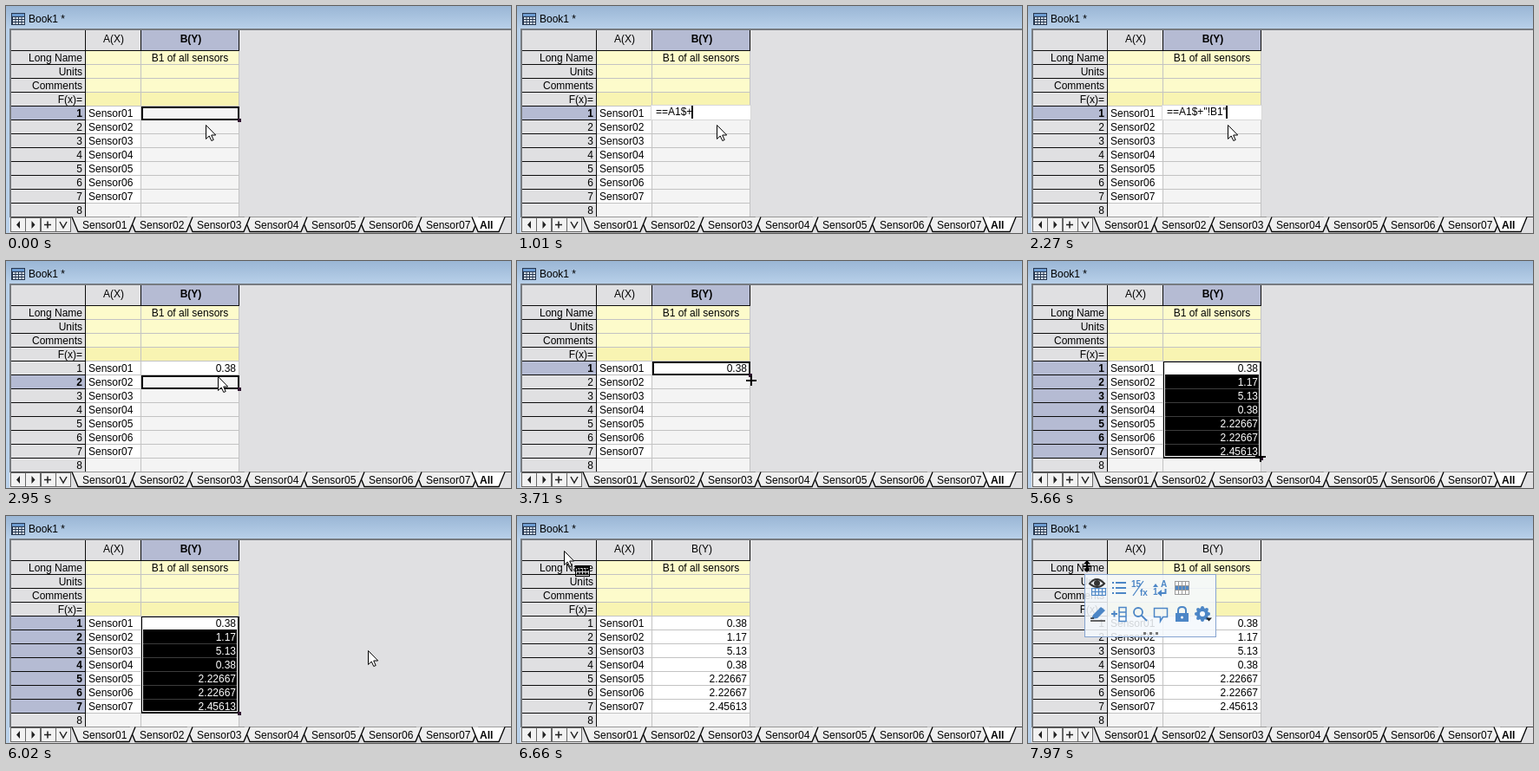
Animation of 582 by 262 pixels, one loop 8000 ms. Source, as an HTML page with a canvas:

```html
<!DOCTYPE html>
<html lang="en">
<head>
<meta charset="utf-8">
<style>
html, body { margin: 0; width: 100%; height: 100%; overflow: hidden; background: #e0e0e2; }
canvas { display: block; }
</style>
</head>
<body>
<canvas id="stage" width="582" height="262"></canvas>
<script>
const ctx = document.getElementById('stage').getContext('2d');
const LOOP = 8000, ROW = 16, TOP = 116;
const COL_A = 92, COL_B = 156, RIGHT = 268, WIDTH_B = RIGHT - COL_B;
const PANEL = '#e0e0e2', MARKED = '#b5bbd3', LINE = '#0c0c0c', GRID = '#c3c3c3';
const BLUE = '#4c86c6', INK = '#000';
const values = ['0.38', '1.17', '5.13', '0.38', '2.22667', '2.22667', '2.45613'];
const formula = '==A1$+"!B1"';
const keyTimes = [310, 390, 470, 550, 630, 930, 1090, 1400, 1550, 1950, 2270];
const ENTER = 2670, RESELECT = 3330, DRAG = 3940, FILL = 5660, DESELECT = 6157;

// Pointer moves: first step, last step, step count, end x, end y
const moves = [
  [2740, 3100, 6, 258, 129],
  [3480, 3480, 1, 265, 131],
  [3710, 3710, 1, 270, 138],
  [3940, 3940, 1, 268, 137],
  [4110, 4880, 11, 268, 222],
  [5350, 5430, 2, 268, 225],
  [5660, 5660, 1, 268, 226],
  [5810, 6070, 4, 444, 142],
  [6244, 6590, 5, 48, 33],
  [6660, 6660, 1, 54, 40],
  [6740, 6740, 1, 51, 38],
  [6890, 6970, 2, 51, 42],
  [7890, 7890, 1, 62, 54],
  [7970, 7970, 1, 68, 58]
];
const clicks = [[3330, 3405], [DRAG, FILL], [DESELECT, 6244], [7200, 7350]];
const within = (t, from, to) => t >= from && t < to;

function pointerAt(t) {
  let x = 230, y = 137;
  for (const [start, end, steps, toX, toY] of moves) {
    if (t < start) break;
    const gap = (end - start) / (steps - 1 || 1);
    const done = gap ? Math.min(steps, Math.floor((t - start) / gap + 1e-6) + 1) : 1;
    const p = done / steps, ease = p * p * (3 - 2 * p);
    x += (toX - x) * ease;
    y += (toY - y) * ease;
  }
  return [Math.round(x), Math.round(y)];
}

function rect(x, y, w, h, color) {
  ctx.fillStyle = color;
  ctx.fillRect(x, y, w, h);
}

function frame(x, y, w, h, color, size = 1) {
  ctx.strokeStyle = color;
  ctx.lineWidth = size;
  ctx.strokeRect(x + size / 2, y + size / 2, w - size, h - size);
}

function text(str, x, y, { align = 'left', color = INK, bold = false, size = 12 } = {}) {
  ctx.font = `${bold ? 'bold ' : ''}${size}px "Liberation Sans", Arial, sans-serif`;
  ctx.textAlign = align;
  ctx.fillStyle = color;
  ctx.fillText(str, x, y);
}

function shape(d, { fill, stroke, width = 1, x = 0, y = 0 }) {
  const path = new Path2D(d);
  ctx.save();
  ctx.translate(x, y);
  if (fill) { ctx.fillStyle = fill; ctx.fill(path); }
  if (stroke) { ctx.strokeStyle = stroke; ctx.lineWidth = width; ctx.stroke(path); }
  ctx.restore();
}

function disc(x, y, r, color) {
  ctx.fillStyle = color;
  ctx.beginPath();
  ctx.arc(x, y, r, 0, 2 * Math.PI);
  ctx.fill();
}

function drawWindow() {
  const caption = ctx.createLinearGradient(0, 0, 0, 27);
  caption.addColorStop(0, '#9ab6d5');
  caption.addColorStop(1, '#b9d1ea');
  rect(0, 0, 582, 262, PANEL);
  rect(0, 0, 582, 27, caption);
  rect(0, 27, 4, 235, '#b9d1ea');
  rect(4, 26, 578, 2, '#777b80');
  rect(4, 26, 2, 236, '#777b80');
  rect(6, 8, 16, 14, '#26364e');
  rect(7, 9, 14, 3, '#6c9bd0');
  for (let i = 0; i < 12; i++) rect(8 + i % 4 * 3.5, 13 + (i >> 2) * 3, 2.5, 2, '#dbe6f2');
  text('Book1 *', 26, 19);
}

function drawSheet(filled, first, last) {
  const marked = first > 0;
  rect(6, 28, 85, 23, PANEL);
  rect(COL_B, 28, WIDTH_B, 23, marked ? MARKED : PANEL);
  text('A(X)', 124, 42, { align: 'center' });
  text('B(Y)', 213, 42, { align: 'center', bold: marked });

  rect(COL_A, 52, RIGHT - COL_A, 48, '#fdfbcb');
  rect(COL_A, 100, RIGHT - COL_A, 15, '#f8f4b2');
  ['Long Name', 'Units', 'Comments', 'F(x)='].forEach((label, i) =>
    text(label, 88, 64 + i * ROW, { align: 'right' }));
  text('B1 of all sensors', 212, 64, { align: 'center' });

  for (let row = 1; row <= 8; row++) {
    const y = TOP + (row - 1) * ROW, chosen = row >= first && row <= last;
    if (chosen) rect(6, y, 85, 15, MARKED);
    text(row, 88, y + 12, { align: 'right', bold: chosen });
    const dark = chosen && row > first;
    rect(COL_A, y, 63, 15, row < 8 ? '#fff' : '#f4f4f4');
    rect(COL_B, y, WIDTH_B, 15, dark ? INK : row <= filled ? '#fff' : '#f4f4f4');
    if (row < 8) text('Sensor0' + row, 95, y + 12);
    if (row <= filled) text(values[row - 1], 265, y + 12, { align: 'right', color: dark ? '#fff' : INK });
  }

  for (let y = 51; y < 244; y += ROW) {
    rect(6, y, 85, 1, LINE);
    rect(COL_A, y, RIGHT - COL_A + 1, 1, y < 52 ? LINE : GRID);
  }
  for (const x of [91, 155, RIGHT]) {
    rect(x, 28, 1, 24, LINE);
    rect(x, 52, 1, 192, x < 92 ? LINE : GRID);
  }
  for (let row = first; row < last; row++) {
    rect(COL_B, TOP + row * ROW - 1, WIDTH_B, 1, row === first ? INK : '#3c3c3c');
  }
}

function drawSelection(first, last) {
  const y = TOP + (first - 1) * ROW, h = (last - first + 1) * ROW;
  frame(COL_B, y, WIDTH_B + 1, h, INK, 2);
  if (last > first) frame(COL_B + 1, y + 1, WIDTH_B - 2, h - 3, '#fff');
  rect(267, y + h - 2, 4, 4, '#301430');
}

function drawDragOutline(rows) {
  const h = rows * ROW - 1;
  ctx.globalCompositeOperation = 'difference';
  for (let y = 0; y < h; y++) {
    for (let x = y % 2; x < WIDTH_B; x += 2) {
      if (x < 3 || x >= WIDTH_B - 3 || y < 3 || y >= h - 3) rect(COL_B + x, TOP + y, 1, 1, '#fff');
    }
  }
  ctx.globalCompositeOperation = 'source-over';
}

function drawEditor(t) {
  const typed = formula.slice(0, keyTimes.filter(k => k <= t).length);
  rect(155, 114, 115, 18, '#fff');
  frame(154, 114, 116, 18, '#d8d8d8');
  text(typed, 160, 126);
  rect(Math.round(159 + ctx.measureText(typed).width), 115, 2, 15, INK);
}

function drawTabs() {
  rect(4, 244, 578, 18, PANEL);
  rect(6, 243, 576, 1, '#404040');
  for (let i = 0; i < 4; i++) {
    const x = Math.round(5 + i * 17.4);
    rect(x, 244, 18, 17, '#f2f2f2');
    frame(x, 244, 18, 17, '#666');
  }
  shape('M16 248v9l-4-4.5zM29.5 248v9l4-4.5z', { fill: '#222' });
  shape('M44 252.5h8M48 248.5v8M62 249l4 7 4-7', { stroke: '#222', width: 1.5 });

  const tab = (x, w, fill) => {
    shape(`M${x} 243.5l7 17h${w - 14}l7-17z`, { fill });
    shape(`M${x} 243.5l7 17h${w - 14}l7-17`, { stroke: INK, width: 1.3 });
  };
  for (let i = 6; i >= 0; i--) {
    tab(76 + i * 66, 73, '#efefef');
    text('Sensor0' + (i + 1), 88 + i * 66, 257);
  }
  tab(537, 38, '#fff');
  text('All', 546, 257, { bold: true });
}

function drawToolbar(alpha) {
  ctx.globalAlpha = alpha * 0.86;
  rect(65, 67, 152, 73, '#f4f8fd');
  ctx.globalAlpha = alpha;
  frame(65, 67, 152, 73, '#86a4d0');

  // Upper row: show, list, format, sort, table
  shape('M71 78q8-10 17 0q-8 8-17 0z', { stroke: '#333', width: 2 });
  disc(79.5, 77.5, 3.5, '#333');
  rect(73, 83, 17, 9, BLUE);
  for (let i = 0; i < 8; i++) rect(74 + i % 4 * 4, 84 + (i >> 2) * 4, 3, 3, '#dce8f5');
  for (const y of [77, 83, 89]) {
    rect(97, y - 1, 2, 2, BLUE);
    rect(101, y - 1, 12, 2, BLUE);
  }
  text('15', 119, 82, { color: BLUE, size: 10, bold: true });
  text('fx', 129, 92, { color: BLUE, size: 10, bold: true });
  shape('M121 92l12-17', { stroke: BLUE, width: 1.3 });
  text('1', 144, 91, { color: BLUE, size: 10, bold: true });
  text('A', 153, 82, { color: BLUE, size: 10, bold: true });
  shape('M158.5 84v5h-6', { stroke: BLUE, width: 2 });
  shape('M149 89l5-4v8zM147 82l-3 0 3-4 3 4z', { fill: BLUE });
  rect(169, 75, 17, 16, '#9a9a9a');
  for (let i = 0; i < 12; i++) {
    rect(170 + i % 4 * 4, 76 + (i >> 2) * 5, 3, 4, (i >> 2) === 1 ? BLUE : '#fff');
  }

  // Lower row: edit, insert, zoom, note, lock, settings
  shape('M75 114l9-9 5 4-9 9-7 1z', { fill: BLUE });
  shape('M72 121h17M76 118h-4', { stroke: '#333', width: 1.5 });
  shape('M96 113h7M99.5 109.5v7', { stroke: BLUE, width: 2 });
  shape('M105 105.5h8v16h-8zM105 111h8M105 116h8', { stroke: BLUE, width: 1.5 });
  shape('M122 111a5 5 0 1 0 10 0a5 5 0 1 0-10 0M131 115l6 6', { stroke: BLUE, width: 1.8 });
  shape('M145.5 106.5h15v10h-5l-3 5v-5h-7z', { stroke: BLUE, width: 1.5 });
  rect(170, 112, 15, 10, BLUE);
  shape('M173 112v-3q0-4 4.5-4t4.5 4v3', { stroke: BLUE, width: 2 });
  disc(177.5, 117, 1.5, '#fff');
  for (let i = 0; i < 8; i++) {
    const a = i * Math.PI / 4;
    disc(201 + 7 * Math.cos(a), 113 + 7 * Math.sin(a), 2, BLUE);
  }
  disc(201, 113, 7, BLUE);
  disc(201, 113, 3, '#f4f8fd');
  shape('M205 117.5h7l-3.5 4z', { fill: '#222' });
  for (const x of [133, 140, 147]) rect(x, 134, 3, 3, '#777');
  ctx.globalAlpha = 1;
}

function drawPointer(t, x, y) {
  if (clicks.some(([from, to]) => within(t, from, to))) disc(x + 0.5, y, 11.5, 'rgba(247,230,66,.88)');
  if (within(t, 3710, 5810)) {
    rect(x - 6, y - 1, 12, 2, INK);
    rect(x - 1, y - 6, 2, 12, INK);
  } else if (t >= 7970) {
    shape('M0-7l4 4.5h-3v1.5h4v2h-4v1.5h3l-4 4.5-4-4.5h3v-1.5h-4v-2h4v-1.5h-3z', { x, y, fill: INK });
  } else {
    shape('M.5.5v16l3.7-3.5 2.6 5.5 2.4-1-2.5-5.5h5z', { x, y, fill: '#fff', stroke: INK });
    if (within(t, 6590, 7890)) {
      frame(x + 13, y + 17, 17, 13, INK);
      rect(x + 14, y + 18, 15, 2, INK);
      for (let i = 0; i < 8; i++) rect(x + 15 + i % 4 * 3.5, y + 21 + (i >> 2) * 4, 2.5, 3, INK);
    }
  }
}

function draw(t) {
  const filled = t < ENTER ? 0 : t < FILL ? 1 : 7;
  const first = t >= DESELECT ? 0 : within(t, ENTER, RESELECT) ? 2 : 1;
  const last = within(t, FILL, DESELECT) ? 7 : first;
  const [x, y] = pointerAt(t);

  drawWindow();
  drawSheet(filled, first, last);
  if (within(t, 230, ENTER)) drawEditor(t);
  else if (first) drawSelection(first, last);
  if (within(t, DRAG, FILL)) {
    drawDragOutline(t >= 5200 ? 7 : Math.max(1, Math.floor((y - TOP) / ROW)));
  }
  drawTabs();
  if (t >= 7350) drawToolbar(Math.min(1, (Math.floor((t - 7350) / 80) + 1) / 3));
  drawPointer(t, x, y);
}

function tick() {
  draw(performance.now() % LOOP);
  requestAnimationFrame(tick);
}
tick();
</script>
</body>
</html>
```
